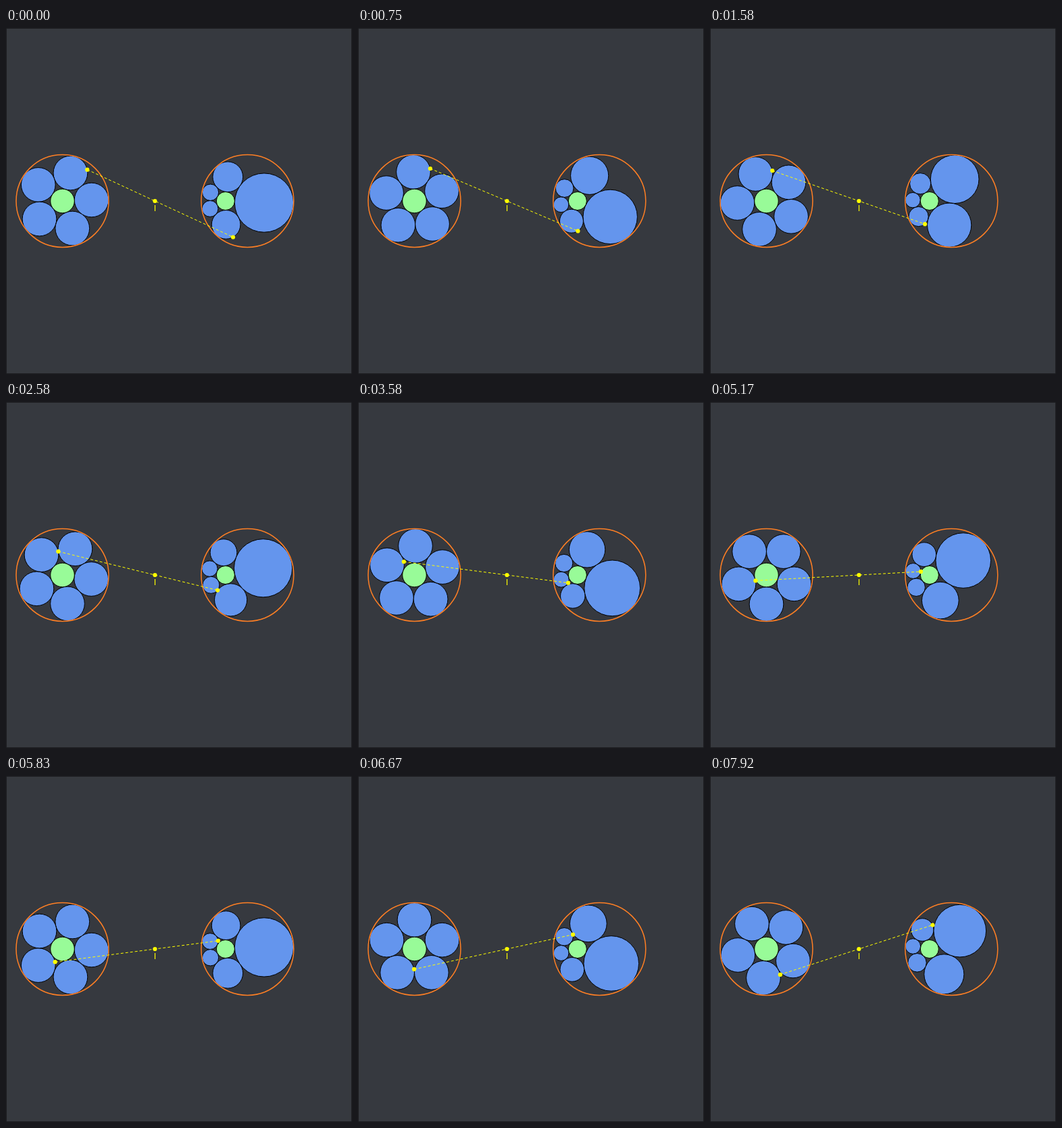
An HTML page with a canvas that plays this animation: 512x512 px, repeating every 8 s.

```html
<!DOCTYPE html>
<html lang="en">
<head>
<meta charset="utf-8">
<title>Inversion of a Steiner chain</title>
<style>
  html, body { margin: 0; width: 100%; height: 100%; overflow: hidden; background: #36393f; }
  canvas { display: block; width: 100vw; height: 100vh; }
</style>
</head>
<body>
<canvas id="stage" width="512" height="512"></canvas>
<script>
const ctx = document.getElementById('stage').getContext('2d');
const LOOP = 8000, STEP = 1000 / 12, DEG = Math.PI / 180;
const BLUE = '#6495ed', GREEN = '#98fb98', ORANGE = '#ff7f24', YELLOW = '#ffff00';

// Everything is measured from the inversion centre.
const ORIGIN = { x: 220.4, y: 256 };
const OUTER = 68.45;
const POWER = 3 * OUTER * OUTER;

// Closed ring of equal circles between two concentric ones.
const COUNT = 5;
const ratio = Math.sin(Math.PI / COUNT);
const INNER = OUTER * (1 - ratio) / (1 + ratio);
const LINK = (OUTER - INNER) / 2;
const ORBIT = INNER + LINK;
const MARK_ANGLE = -0.195;

const circle = (x, y, r) => ({ x, y, r });

// Inversion with negative power: the image lies on the far side of the centre.
function invert({ x, y, r }) {
  const s = -POWER / (x * x + y * y - r * r);
  return circle(x * s, y * s, Math.abs(r * s));
}

function drawCircle({ x, y, r }, fill, stroke, width = 1) {
  ctx.beginPath();
  ctx.arc(x, y, r, 0, 2 * Math.PI);
  if (fill) {
    ctx.fillStyle = fill;
    ctx.fill();
  }
  if (stroke) {
    ctx.strokeStyle = stroke;
    ctx.lineWidth = width;
    ctx.stroke();
  }
}

function drawWithImage(c, ...style) {
  drawCircle(c, ...style);
  drawCircle(invert(c), ...style);
}

function drawDot({ x, y }) {
  drawCircle(circle(x, y, 3.1), YELLOW);
}

function drawGuide(from, to) {
  ctx.strokeStyle = YELLOW;
  ctx.lineWidth = 1;
  ctx.setLineDash([4, 3]);
  ctx.beginPath();
  ctx.moveTo(from.x, from.y);
  ctx.lineTo(to.x, to.y);
  ctx.stroke();
  ctx.setLineDash([]);
}

function drawScene(turn) {
  ctx.setTransform(1, 0, 0, 1, 0, 0);
  ctx.fillStyle = '#36393f';
  ctx.fillRect(0, 0, 512, 512);
  ctx.strokeStyle = '#1b1c1f';
  ctx.lineWidth = 1;
  ctx.strokeRect(0.5, 0.5, 511, 511);
  ctx.translate(ORIGIN.x, ORIGIN.y);

  const centre = -2 * OUTER;
  const links = Array.from({ length: COUNT }, (_, i) => {
    const a = turn + i * 2 * Math.PI / COUNT;
    return circle(centre + ORBIT * Math.cos(a), -ORBIT * Math.sin(a), LINK);
  });
  links.forEach(link => drawWithImage(link, BLUE, '#000'));
  drawWithImage(circle(centre, 0, INNER), GREEN, '#000');
  drawWithImage(circle(centre, 0, OUTER), null, ORANGE, 1.5);

  const mark = circle(
    links[0].x + LINK * Math.cos(MARK_ANGLE),
    links[0].y + LINK * Math.sin(MARK_ANGLE), 0);
  const image = invert(mark);
  drawGuide(mark, image);
  [mark, image, { x: 0, y: 0 }].forEach(drawDot);

  ctx.fillStyle = YELLOW;
  ctx.font = '12px "DejaVu Sans", sans-serif';
  ctx.textAlign = 'center';
  ctx.fillText('I', 0, 14.5);
}

const start = performance.now();
function tick() {
  const time = (performance.now() - start) % LOOP;
  // Twelve poses a second, two degrees apart.
  const pose = Math.floor((time + 3.4) / STEP) % 96;
  drawScene((74 + 2 * pose) * DEG);
  requestAnimationFrame(tick);
}
tick();
</script>
</body>
</html>
```
